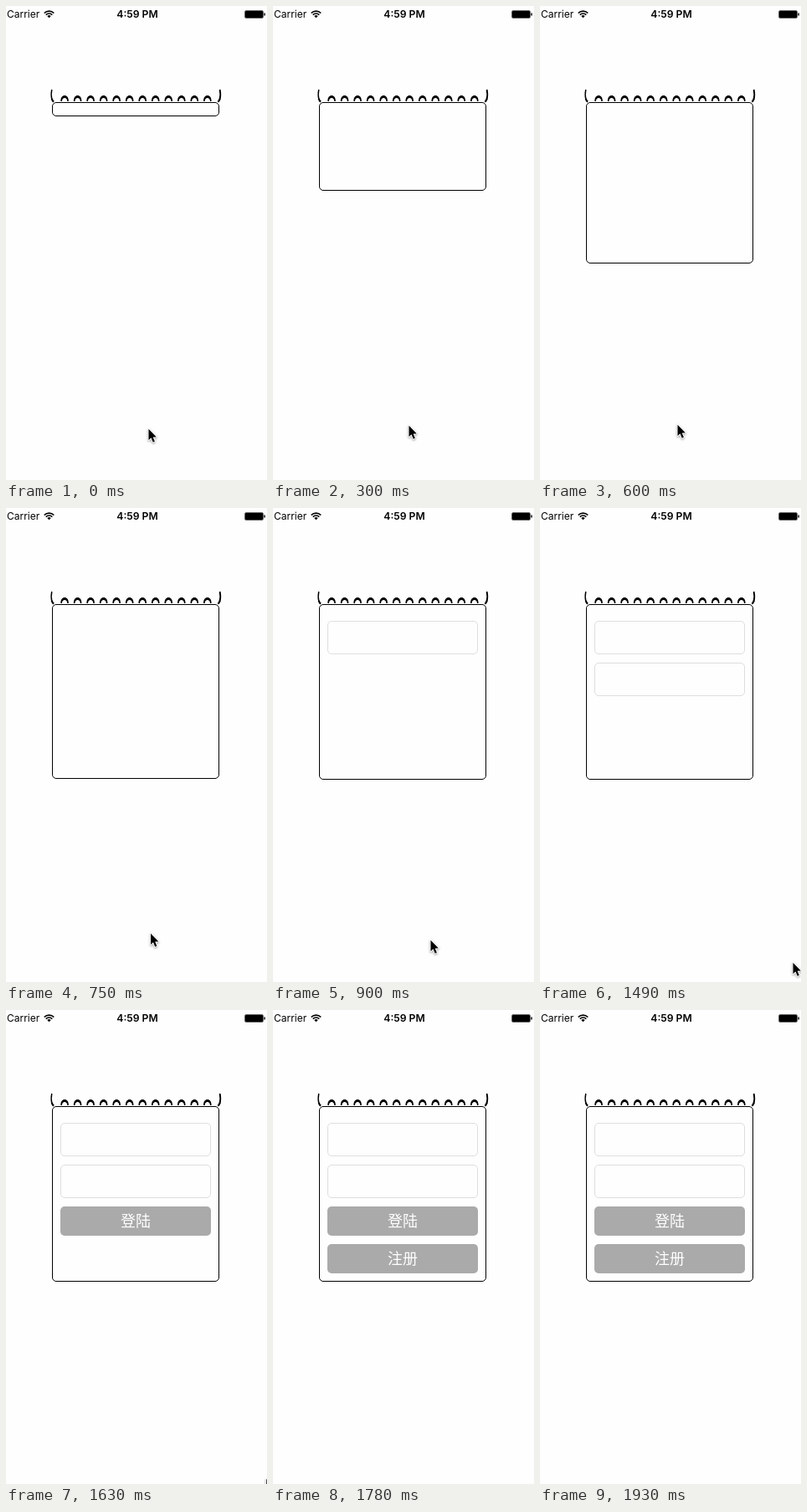
Recreate the animation shown at these times as an HTML page with a canvas. Size 312 px wide and 567 px high, loop 3700 ms.

```html
<!DOCTYPE html>
<html lang="zh">
<head>
<meta charset="utf-8">
<title>Notepad login</title>
<style>
  html, body { margin: 0; width: 100%; height: 100%; overflow: hidden; background: #fefefe; }
  canvas { display: block; width: 312px; height: 567px; }
</style>
</head>
<body>
<canvas id="stage"></canvas>
<script>
const W = 312, H = 567, LOOP = 3700;
const canvas = document.getElementById('stage');
const ctx = canvas.getContext('2d');
const dpr = window.devicePixelRatio || 1;
canvas.width = W * dpr;
canvas.height = H * dpr;

const steps = [0, 150, 300, 450, 600, 750, 900, 1050, 1200, 1350, 1490, 1630, 1780];
const pointer = [
  [170.5, 506], [163.5, 502], [162.5, 502], [162.5, 501], [164.5, 501], [173, 509],
  [188.5, 517], [235.5, 524], [281.5, 530], [291.5, 532], [302.5, 544], [311.3, 561]
];
const pageBottoms = [132, 168, 221, 269, 308, 324];

function roundRect(x, y, w, h, r) {
  ctx.beginPath();
  ctx.moveTo(x + r, y);
  ctx.arcTo(x + w, y, x + w, y + h, r);
  ctx.arcTo(x + w, y + h, x, y + h, r);
  ctx.arcTo(x, y + h, x, y, r);
  ctx.arcTo(x, y, x + w, y, r);
  ctx.closePath();
}

function outline(x, y, w, h, r, color) {
  roundRect(x + 0.5, y + 0.5, w - 1, h - 1, r);
  ctx.strokeStyle = color;
  ctx.lineWidth = 1;
  ctx.stroke();
}

function text(str, x, y, font, color, align) {
  ctx.font = font;
  ctx.fillStyle = color;
  ctx.textAlign = align;
  ctx.fillText(str, x, y);
}

function drawWifi(x, y) {
  const a = Math.PI * 1.25, b = Math.PI * 1.75;
  ctx.strokeStyle = ctx.fillStyle = '#000';
  ctx.lineWidth = 1.7;
  for (const r of [8.2, 5.3]) {
    ctx.beginPath();
    ctx.arc(x, y, r, a, b);
    ctx.stroke();
  }
  ctx.beginPath();
  ctx.moveTo(x, y);
  ctx.arc(x, y, 3.2, a, b);
  ctx.fill();
}

function drawStatusBar() {
  text('Carrier', 1, 14.3, '400 12px Inter, sans-serif', '#000', 'left');
  text('4:59 PM', 157, 14.3, '600 12.2px Inter, sans-serif', '#000', 'center');
  drawWifi(51.5, 14.3);
  outline(285, 5, 23, 10, 1.5, '#666');
  ctx.fillStyle = '#000';
  roundRect(286, 6, 21, 8, 0.8);
  ctx.fill();
  roundRect(308.4, 8.3, 1.4, 3.4, 0.7);
  ctx.fill();
}

function drawCoil(x) {
  ctx.beginPath();
  ctx.moveTo(x, 114);
  ctx.bezierCurveTo(x - 0.6, 104.6, x + 10, 104.6, x + 9.4, 114);
  ctx.lineTo(x + 7.9, 114);
  ctx.bezierCurveTo(x + 7.8, 108.6, x + 1.6, 108.6, x + 1.5, 114);
  ctx.closePath();
  ctx.fill();
}

function drawHook(x, side, width) {
  ctx.lineWidth = width;
  ctx.beginPath();
  ctx.moveTo(x + side * 0.6, 100);
  ctx.bezierCurveTo(x - side * 0.3, 104, x - side * 0.2, 109, x + side * 0.7, 112);
  ctx.stroke();
  ctx.lineWidth = 2;
  ctx.beginPath();
  ctx.moveTo(x + side * 0.5, 110.8);
  ctx.quadraticCurveTo(x + side, 113.3, x + side * 2.9, 114.6);
  ctx.stroke();
}

function drawBinding() {
  ctx.fillStyle = ctx.strokeStyle = '#000';
  for (let i = 0; i < 12; i++) drawCoil(65.4 + i * 15.52);
  drawHook(54.2, 1, 1.4);
  drawHook(256.2, -1, 1.8);
}

function drawButton(label, y) {
  roundRect(65, y, 180, 35, 5);
  ctx.fillStyle = '#aaa';
  ctx.fill();
  text(label, 155, y + 24.3, '350 18px "Noto Sans CJK SC", "Noto Sans CJK", sans-serif', '#fff', 'center');
}

function drawPointer(x, y) {
  ctx.save();
  ctx.translate(x, y);
  ctx.beginPath();
  ctx.moveTo(0, 0);
  for (const [px, py] of [[0, 13.3], [3, 10.5], [5.2, 15.8], [7.4, 14.9], [5.2, 9.7], [9.3, 9.5]]) {
    ctx.lineTo(px, py);
  }
  ctx.closePath();
  ctx.lineJoin = 'round';
  ctx.lineWidth = 1.8;
  ctx.strokeStyle = '#fff';
  ctx.shadowColor = 'rgba(0,0,0,0.4)';
  ctx.shadowBlur = 2.5 * dpr;
  ctx.shadowOffsetY = dpr;
  ctx.stroke();
  ctx.shadowColor = 'transparent';
  ctx.fillStyle = '#000';
  ctx.fill();
  ctx.restore();
}

function draw(time) {
  let step = 0;
  while (step + 1 < steps.length && time >= steps[step + 1]) step++;
  const start = steps[step];

  ctx.setTransform(dpr, 0, 0, dpr, 0, 0);
  ctx.fillStyle = '#fefefe';
  ctx.fillRect(0, 0, W, H);
  drawStatusBar();
  drawBinding();
  outline(55, 115, 200, (pageBottoms[step] || 325) - 115, 4.5, '#000');
  if (start >= 900) outline(65, 135, 180, 40, 4.5, '#dedede');
  if (start >= 1200) outline(65, 185, 180, 40, 4.5, '#dedede');
  if (start >= 1630) drawButton('登陆', 235);
  if (start >= 1780) drawButton('注册', 280);
  if (pointer[step]) drawPointer(...pointer[step]);
}

const origin = performance.now();
function tick() {
  draw((performance.now() - origin) % LOOP);
  requestAnimationFrame(tick);
}
tick();
</script>
</body>
</html>
```
